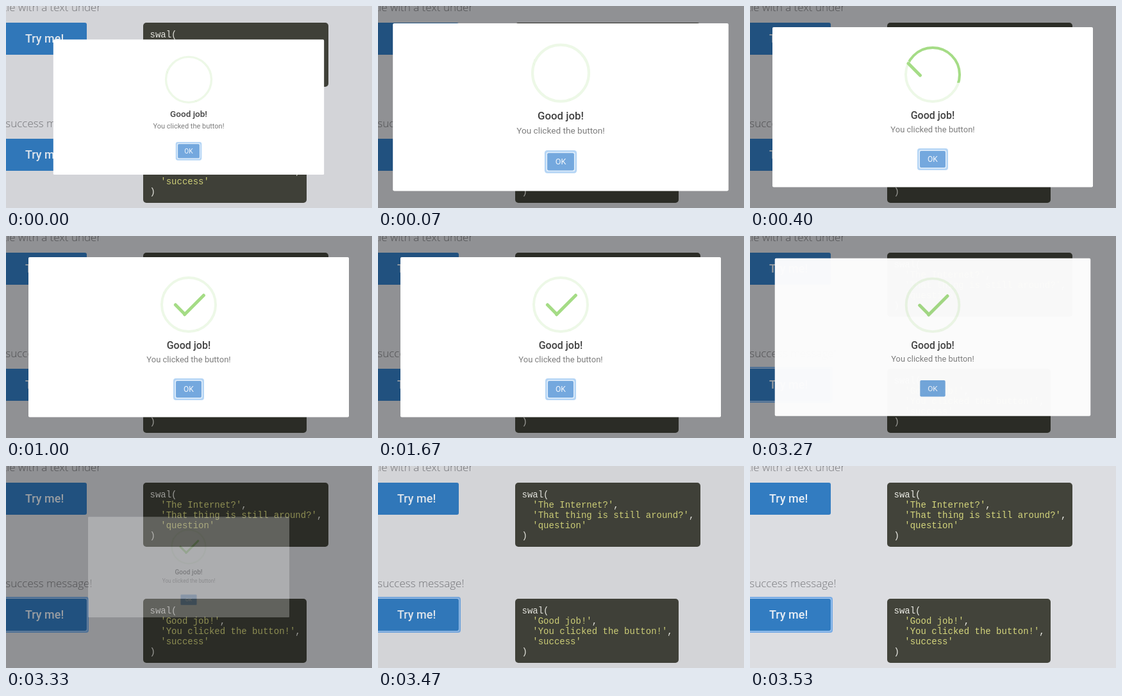
An HTML page with a canvas that plays this animation: 571 by 315 pixels, repeating every 3.59 s.

```html
<!DOCTYPE html>
<html lang="en">
<head>
<meta charset="utf-8">
<title>Success dialog</title>
<style>
  html, body { margin: 0; width: 100%; height: 100%; overflow: hidden; background: #dcdde1; }
  canvas { display: block; width: 571px; height: 315px; }
</style>
</head>
<body>
<canvas id="stage"></canvas>
<script>
const W = 571, H = 315, LOOP = 3590, TICK = 200 / 3;
const LEAD = 48;      // the dialog is already this old when the loop begins
const CLOSE = 3263;   // the dialog starts to shrink
const HIDE = 150;
const dpr = window.devicePixelRatio || 1;

function surface(canvas) {
  canvas.width = Math.round(W * dpr);
  canvas.height = Math.round(H * dpr);
  const ctx = canvas.getContext('2d');
  ctx.scale(dpr, dpr);
  return ctx;
}

const screen2d = surface(document.getElementById('stage'));
const layer = surface(document.createElement('canvas'));
let g = screen2d;

const SANS = 'Roboto, sans-serif';
const LIGHT = '"Open Sans", sans-serif';
const MONO = '"Liberation Mono", monospace';
const GREEN = '#a5dc86';

const mix = (a, b, p) => a + (b - a) * p;

function bezier(x1, y1, x2, y2) {
  const curve = (a, b, u) => 3 * a * u * (1 - u) ** 2 + 3 * b * u * u * (1 - u) + u ** 3;
  return x => {
    if (x <= 0) return 0;
    if (x >= 1) return 1;
    let lo = 0, hi = 1;
    for (let i = 0; i < 24; i++) {
      const u = (lo + hi) / 2;
      if (curve(x1, x2, u) < x) lo = u; else hi = u;
    }
    return curve(y1, y2, lo);
  };
}
const ease = bezier(.25, .1, .25, 1);
const easeIn = bezier(.42, 0, 1, 1);

// Keys are [time, ...values]; each segment is eased on its own.
function keyed(keys, t, curve = ease) {
  const next = keys.findIndex(k => t < k[0]);
  if (next === 0) return keys[0].slice(1);
  if (next < 0) return keys[keys.length - 1].slice(1);
  const a = keys[next - 1], b = keys[next];
  const p = curve((t - a[0]) / (b[0] - a[0]));
  return a.slice(1).map((v, i) => mix(v, b[i + 1], p));
}

const POP = [[20, .7], [131, 1.05], [240, .95], [300, 1]];
const SHADE = [[0, .04], [70, .345], [3400, .345], [3520, 0]];
const TURN = [[225, -45], [525, -405]];
// Tick strokes: time, left, top, width inside the icon.
const TIP = [[405, 2, 17, 0], [525, -8, 37, 50], [630, 21, 48, 17], [750, 14, 45, 25]];
const LONG = [[488, 34, 54, 0], [630, 25, 35, 55], [750, 25, 38, 47]];

function box(x, y, w, h, r, fill) {
  g.beginPath();
  g.roundRect(x, y, w, h, r);
  g.fillStyle = fill;
  g.fill();
}

function text(str, x, y, font, fill, align = 'left') {
  g.font = font;
  g.fillStyle = fill;
  g.textAlign = align;
  g.fillText(str, x, y);
}

function tilted(x, y, w, h, deg, r, fill) {
  g.save();
  g.translate(x + w / 2, y + h / 2);
  g.rotate(deg * Math.PI / 180);
  box(-w / 2, -h / 2, w, h, r, fill);
  g.restore();
}

function ring(color) {
  g.beginPath();
  g.arc(40, 40, 42, 0, Math.PI * 2);
  g.lineWidth = 4;
  g.strokeStyle = color;
  g.stroke();
}

// White half disc whose round side faces the given angle.
function halfDisc(x, y, deg) {
  const a = deg * Math.PI / 180;
  g.beginPath();
  g.arc(x, y, 60, a - Math.PI / 2, a + Math.PI / 2);
  g.fillStyle = '#fff';
  g.fill();
}

function tryButton(y, focused) {
  if (focused) {
    box(-6, y - 3, 135, 56, 4, '#78ace5');
    box(-6, y - 1, 133, 52, 3, '#a9cbf0');
  }
  box(-6, y, 132, 50, 3, '#327cc1');
  text('Try me!', 30, y + 31, '500 18px ' + SANS, '#e9eff6');
}

function codeBlock(y, w, args) {
  box(214, y, w, 100, 5, '#42433a');
  const font = '14px ' + MONO, pale = '#eeeee8';
  const put = (s, col, row, color) => text(s, 224.5 + col * 8.4, y + 23 + row * 16, font, color);
  put('swal(', 0, 0, pale);
  args.forEach((s, i) => {
    put(`'${s}'`, 2, i + 1, '#d5d67c');
    if (i < args.length - 1) put(',', s.length + 4, i + 1, pale);
  });
  put(')', 0, 4, pale);
}

function page(t) {
  g.fillStyle = '#dcdde1';
  g.fillRect(0, 0, W, H);
  text('A title with a text under', 148, 8, '300 17px ' + LIGHT, '#77787c', 'right');
  text('A success message!', 134.5, 189, '300 17px ' + LIGHT, '#77787c', 'right');
  tryButton(26, false);
  tryButton(207, t >= CLOSE);
  codeBlock(26, 289, ['The Internet?', 'That thing is still around?', 'question']);
  codeBlock(207, 255, ['Good job!', 'You clicked the button!', 'success']);
  g.fillStyle = `rgba(0,0,0,${keyed(SHADE, t)[0]})`;
  g.fillRect(0, 0, W, H);
}

// A green ring hidden by two half discs; one of them spins once and uncovers it.
function icon(age) {
  g.save();
  g.translate(245, 67);
  ring(GREEN);
  halfDisc(27, 53, 135);
  halfDisc(30, 49, keyed(TURN, age, easeIn)[0]);
  tilted(28, 8, 7, 90, -45, 0, '#fff');
  ring('rgba(165,220,134,.2)');
  for (const [keys, deg] of [[TIP, 45], [LONG, -45]]) {
    const [x, y, w] = keyed(keys, age);
    if (w > 0) tilted(x, y, w, 5, deg, 2, GREEN);
  }
  g.restore();
}

function okButton(focused) {
  if (focused) {
    box(261, 222, 48, 34, 4, '#b5d5f5');
    box(263.5, 224.5, 43, 29, 3, '#e4f0fb');
  }
  box(265, 226, 40, 26, 2, '#74a8de');
  text('OK', 285, 243.2, '12px ' + SANS, '#f4f8fd', 'center');
}

function dialog(t) {
  const age = t + LEAD;
  const gone = ease((t - CLOSE) / HIDE);
  if (gone >= 1) return;
  const scale = keyed(POP, age)[0] * mix(1, .5, gone);

  // Painted on its own layer so that it fades as one piece.
  g = layer;
  g.clearRect(0, 0, W, H);
  g.save();
  g.translate(285, 157.5);
  g.scale(scale, scale);
  g.translate(-285, -157.5);
  box(35, 33, 500, 249.5, 2, '#fff');
  icon(age);
  text('Good job!', 285, 176, '500 16px ' + SANS, '#414141', 'center');
  text('You clicked the button!', 285, 197, '13px ' + SANS, '#7d7d7d', 'center');
  okButton(t < 2870);
  g.restore();

  g = screen2d;
  g.globalAlpha = 1 - gone;
  g.drawImage(layer.canvas, 0, 0, W, H);
  g.globalAlpha = 1;
}

function draw(now) {
  // The picture advances at fifteen steps a second.
  const step = Math.floor((now % LOOP + 4) / TICK);
  const t = Math.round(step * TICK / 10) * 10;
  page(t);
  dialog(t);
}

const began = performance.now();
function loop() {
  draw(performance.now() - began);
  requestAnimationFrame(loop);
}
draw(0);
requestAnimationFrame(loop);
</script>
</body>
</html>
```
